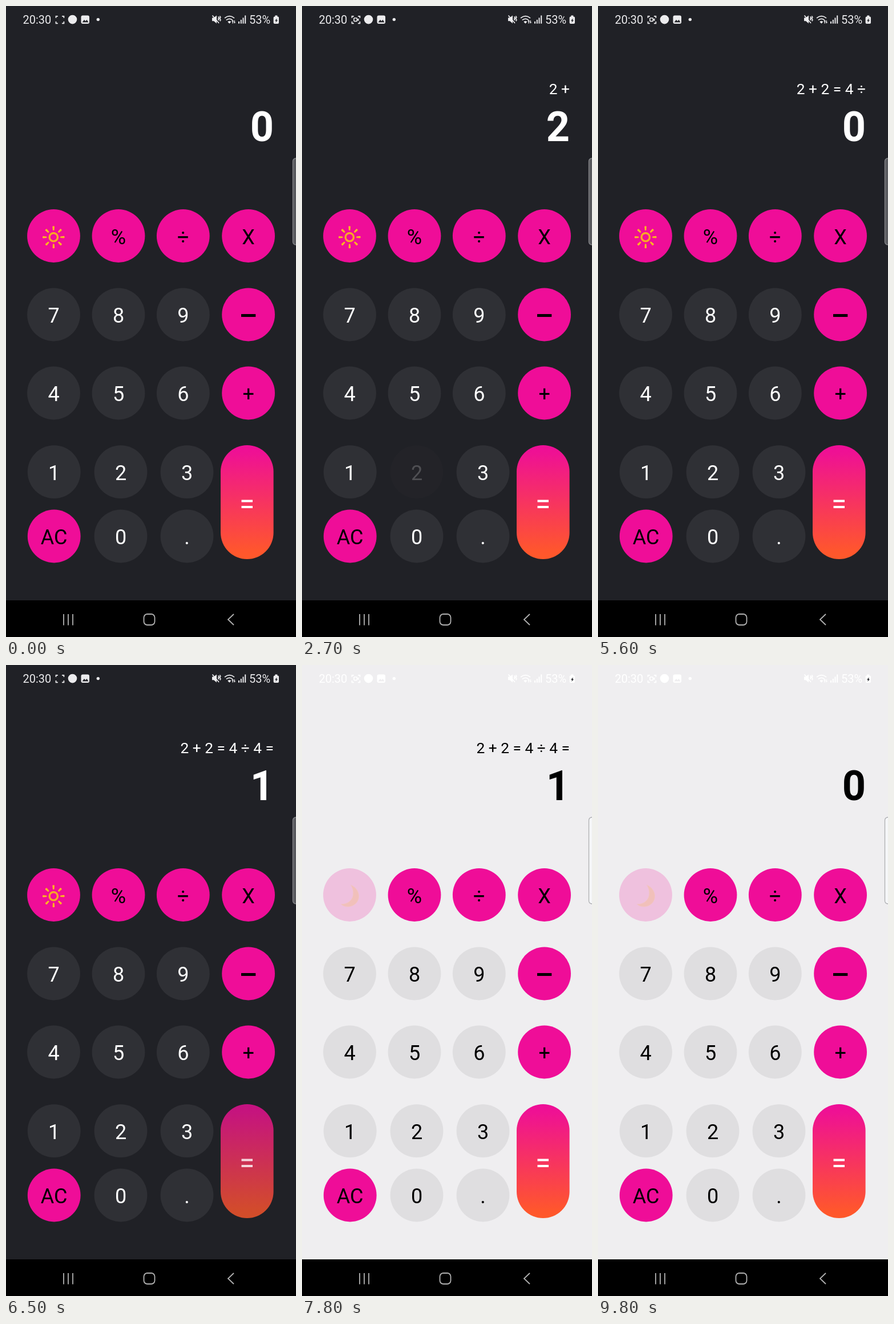
Write an HTML page that moves like this. It is 508 by 1102 pixels and loops after 10 s.

```html
<!DOCTYPE html>
<html lang="en">
<head>
<meta charset="utf-8">
<title>Calculator</title>
<style>
html, body { margin: 0; width: 100%; height: 100%; overflow: hidden; }
svg {
  --bg: #202126; --key: #2f3035; --ink: #fff; --status: #ececee;
  --tab: #5b5c60; --tabEdge: #88898c;
  display: block; width: 100vw; height: 100vh; background: var(--bg);
  font-family: Roboto, sans-serif;
}
svg.light {
  --bg: #efeef0; --key: #dfdee0; --ink: #000; --status: #fff;
  --tab: #f5f6f8; --tabEdge: #adaeb1;
}
.key { font-size: 36px; text-anchor: middle; }
.key > * { opacity: var(--o, 1); }
.num circle { fill: var(--key); }
.num text, .out { fill: var(--ink); }
.op circle { fill: #ef0d98; }
.out { text-anchor: end; }
.status { fill: var(--status); font-size: 20px; }
.line { fill: none; stroke: var(--status); stroke-width: 1.7; }
.nav { fill: none; stroke: #b2b2b2; stroke-width: 1.8; }
.light #sun, svg:not(.light) #moon { display: none; }
</style>
</head>
<body>
<svg id="app" viewBox="0 0 508 1102" preserveAspectRatio="none">
  <defs>
    <linearGradient id="glow" x2="0" y2="1">
      <stop stop-color="#ee0d98"/><stop offset=".08" stop-color="#ef1292"/>
      <stop offset=".93" stop-color="#ff562d"/><stop offset="1" stop-color="#ff592a"/>
    </linearGradient>
    <linearGradient id="gold" x2="0" y2="1">
      <stop stop-color="#fdc928"/><stop offset="1" stop-color="#f9a01b"/>
    </linearGradient>
  </defs>

  <g class="status">
    <text x="29.5" y="30.5">20:30</text>
    <path class="line" d="M87.5 21v-3.2h3.4M98 17.8h3.4V21M101.4 27v3.4H98M90.9 30.4h-3.4V27"/>
    <g id="cam">
      <rect class="line" x="91" y="21" width="5.4" height="5.6" rx="1" stroke-width="1.4"/>
      <path d="M96.5 23.5l3-2v5l-3-2z"/>
    </g>
    <circle cx="116.5" cy="23.6" r="7.8"/>
    <rect x="131.5" y="16.5" width="14.5" height="14.5" rx="3"/>
    <path d="M133.5 28.5l3.5-4.5 2.3 2.6 2.2-2.6 3 4.5z" fill="var(--bg)"/>
    <circle cx="161.3" cy="23.6" r="2.7"/>
    <path d="M361 20.5h3l5-4v14l-5-4.2h-3z"/>
    <path class="line" d="M361.5 16.5l11.5 13.5M371.5 18.5l1.6 2-1.4 2.2 1.4 2.3M374.3 17.5l1.5 2.3-1.4 2.2 1.5 2.3-1 2.2" stroke-width="1.3"/>
    <path class="line" d="M383 21.2q8.5-7 17 0M385.8 24.6q5.8-4.6 11 0"/>
    <path d="M388.3 27.5q3.2-2.4 6 0l-3 3.2zM395 27l2.2-2.5 2.2 2.5h-1.5v3.5h-1.4V27zM398.6 28.2h1.1v-3h1.3v3h1.2l-1.8 2.4z"/>
    <path d="M407 27h2v3.7h-2zM410.8 24h2v6.7h-2zM414.5 20.5h2v10.2h-2zM418.2 16.5h2v14.2h-2z"/>
    <text x="426" y="30.5">53%</text>
    <path d="M471.3 18.5v-2h4v2h.7q2 0 2 2v8.5q0 2-2 2h-5.4q-2 0-2-2v-8.5q0-2 2-2z"/>
    <path d="M474.8 21.5l-3.8 4.2h2l-.7 3.4 3.8-4.4h-2z" fill="#222328"/>
  </g>

  <text class="out" id="sum" x="469" y="154" font-size="26.3"></text>
  <text class="out" id="value" x="469" y="236" font-size="72" font-weight="700"></text>
  <rect x="502.5" y="266" width="16" height="151" rx="5" fill="var(--tab)" stroke="var(--tabEdge)" stroke-width="1.3"/>
  <g id="keys"></g>

  <rect y="1038" width="508" height="64"/>
  <path class="nav" d="M101 1062v19.5M109 1062v19.5M117 1062v19.5M399 1062l-10 9.5 10 9.5"/>
  <rect class="nav" x="241.5" y="1062" width="19" height="19" rx="6"/>
</svg>
<script>
const $ = id => document.getElementById(id);

const rays = Array.from({ length: 8 }, (_, i) =>
  `<path d="M12.3-1.3L18.6-1.9Q20.4 0 18.6 1.9L12.3 1.3Q11 0 12.3-1.3z" transform="rotate(${i * 45})"/>`).join("");
const faces = {
  theme: `<g id="sun" transform="translate(83.3 403.7)" fill="url(#gold)">${rays}
      <circle r="7.2" style="fill:none" stroke="#f9a825" stroke-width="3.4"/></g>
    <path id="moon" fill="#fbc02d" stroke="#fdd560" stroke-width=".8"
      d="M85.5 384.3C102 391 104 411 91 419C83 424 73 422.500 68.500 417.800C80 418 88 411 89.500 402C90.500 395 88.500 389 85.500 384.300z"/>`,
  "-": `<path d="M412 538h25.300v5h-25.300z"/>`
};

function key(name, x, y, r) {
  const type = /[\d.]/.test(name) ? "num" : "op";
  const face = faces[name] || `<text x="${x}" y="${y + 14}">${name}</text>`;
  return `<g class="key ${type}" data-key="${name}"><circle cx="${x}" cy="${y}" r="${r}"/>${face}</g>`;
}

const row = (names, xs, y, r = 46.4) => names.split(" ").map((n, i) => key(n, xs[i], y, r)).join("");
const wide = [83.5, 197, 310.3, 424.6], low = [84.2, 201, 317];
$("keys").innerHTML =
  row("theme % ÷ X", wide, 401.5) +
  row("7 8 9 -", wide, 539) +
  row("4 5 6 +", wide, 676) +
  row("1 2 3", low, 813.7) +
  row("AC 0 .", low, 926) +
  `<g class="key" data-key="="><rect x="376" y="767" width="92.600" height="199" rx="46.300" fill="url(#glow)"/>
    <path d="M412.500 862.500h19.500v4h-19.500zM412.500 873h19.500v4h-19.500z" fill="#fff"/></g>`;

// key, finger down, finger up, history line, result
const presses = [
  ["2", 1100, 1400, "", "2"],
  ["+", 1750, 2000, "2 +", "0"],
  ["2", 2450, 2700, "2 +", "2"],
  ["=", 3150, 3400, "2 + 2 =", "4"],
  ["÷", 4650, 4900, "2 + 2 = 4 ÷", "0"],
  ["4", 5650, 5900, "2 + 2 = 4 ÷", "4"],
  ["=", 6250, 6400, "2 + 2 = 4 ÷ 4 =", "1"],
  ["theme", 7550, 7800, "2 + 2 = 4 ÷ 4 =", "1"],
  ["AC", 9050, 9300, "", "0"],
  ["theme", 9700, 10000, "", "0"]
];
const blinks = [500, 1000, 1500, 2000, 2500, 3100, 3600, 4100, 4600, 5100, 5600, 6100, 6600, 7100, 7600];
const keys = [...document.querySelectorAll(".key")];
const clamp = v => Math.min(1, Math.max(0, v));

function opacity(t, down, up) {
  if (t < up) return 1 - .8 * clamp((t - down) / 100);
  return 1 - .8 * (1 - clamp((t - up) / 200)) ** 2;
}

function draw(t) {
  let sum = "", value = "0";
  const fade = {};
  for (const [name, down, up, line, result] of presses) {
    if (t >= up) [sum, value] = [line, result];
    fade[name] = Math.min(fade[name] ?? 1, opacity(t, down, up));
  }
  for (const k of keys) k.style.setProperty("--o", fade[k.dataset.key] ?? 1);
  $("sum").textContent = sum;
  $("value").textContent = value;
  $("cam").style.display = blinks.filter(b => b <= t).length % 2 ? "" : "none";
  $("app").classList.toggle("light", t >= 7800);
}

const start = performance.now();
function tick() {
  const t = (performance.now() - start) % 10000;
  draw(Math.floor(t / 100) * 100); // ten pictures a second
  requestAnimationFrame(tick);
}
tick();
</script>
</body>
</html>
```
